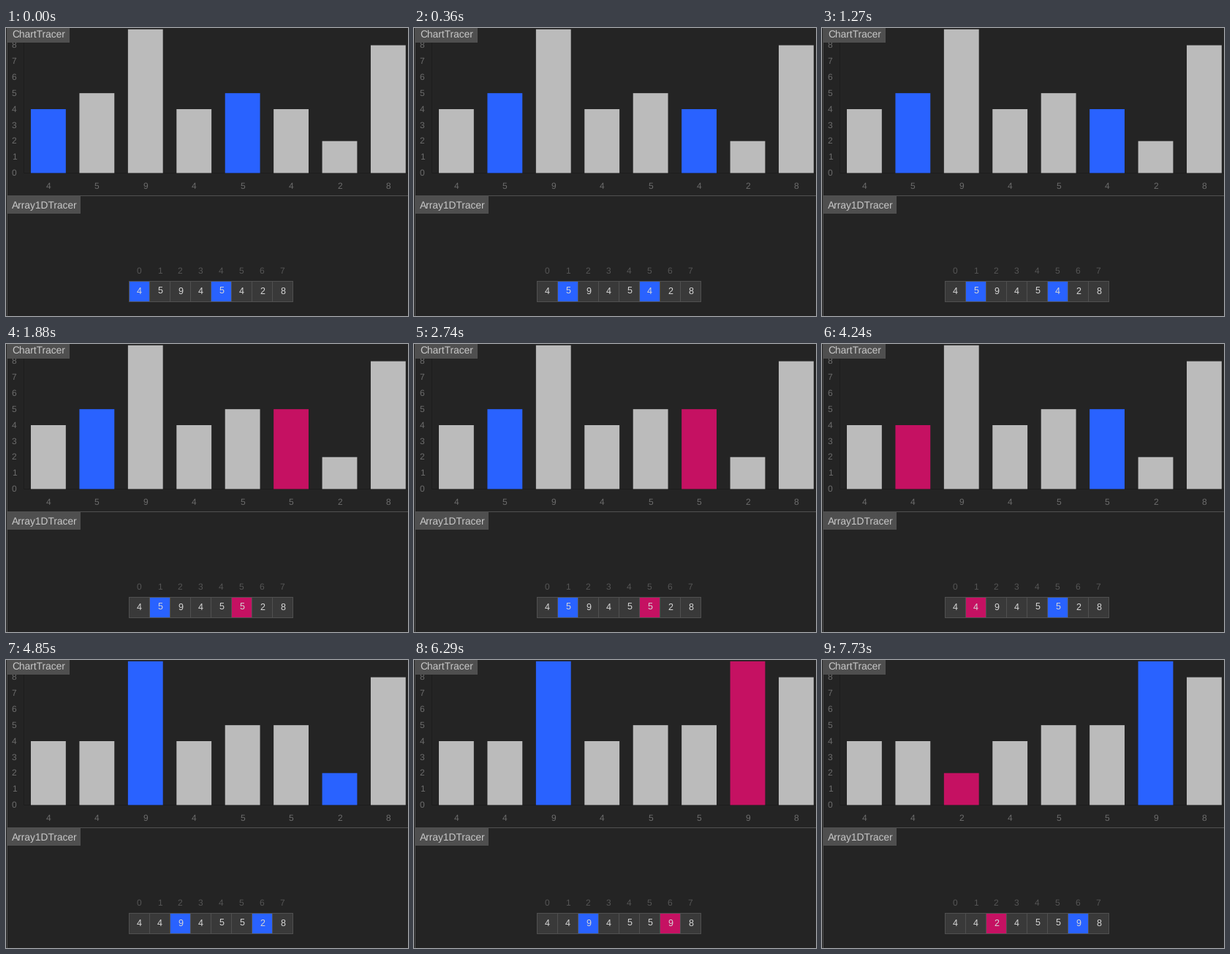
Recreate the animation shown at these times as a matplotlib script. Size 550 by 394 pixels, loop 8 s.

```python
import matplotlib.pyplot as plt
from matplotlib.animation import FuncAnimation
from matplotlib.patches import Rectangle

plt.rcParams["font.family"] = "Liberation Sans"
plt.rcParams["text.hinting"] = "none"
plt.rcParams["toolbar"] = "None"

W, H, DPI = 550, 394, 100
LOOP, STEP = 8000, 20

BACK, CELL, EDGE, TAG = "#242424", "#393939", "#505050", "#4f4f4f"
BAR, BLUE, PINK = "#bbbbbb", "#2962ff", "#c51162"

START = [4, 5, 9, 4, 5, 4, 2, 8]
# start time, selected indices, patched {index: new value}
STEPS = [
    (0, (0, 4), {}),
    (360, (1, 5), {}),
    (1880, (1,), {5: 5}),
    (3320, (5,), {1: 4}),
    (4850, (2, 6), {}),
    (6290, (2,), {6: 9}),
    (7730, (6,), {2: 2}),
]

BASE, UNIT = 198.4, 21.85
BAR_X, BAR_STEP = 34, 66.43
BAR_W = 0.72 * BAR_STEP
CELL_X, CELL_Y, CELL_W = 168, 346, 28

fig = plt.figure(figsize=(W / DPI, H / DPI), dpi=DPI, facecolor=BACK)
ax = fig.add_axes([0, 0, 1, 1])
ax.set_xlim(0, W)
ax.set_ylim(H, 0)
ax.axis("off")


def box(x, y, w, h, color, z=1):
    return ax.add_patch(Rectangle((x, y), w, h, fc=color, lw=0,
                                  zorder=z, snap=False))


def label(x, y, s, px, color, ha="center", z=4):
    return ax.text(x, y, s, fontsize=px * 72 / DPI, color=color,
                   ha=ha, va="baseline", zorder=z)


def tag(y, w, h, s, baseline):
    box(2, y, w, h, TAG, 5)
    label(8, baseline, s, 13.7, "#c8c8c8", "left", 6)


# panels
box(1, 0, 1, H, EDGE)
box(1, 229, W - 1, 1, EDGE)
tag(0, 85, 20, "ChartTracer", 13)
tag(230, 100, 24, "Array1DTracer", 247)

# chart axes
box(24, 0, 1, 199, "#1d1d1d")
box(24, 198, W - 24, 1, "#1d1d1d")
for v in range(9):
    label(11.2, BASE + 3.7 - UNIT * v, str(v), 12, "#6c6c6c")

bars, bar_texts, cells, cell_texts = [], [], [], []
for i, v in enumerate(START):
    x = BAR_X + BAR_STEP * i
    bars.append(box(x, BASE, BAR_W, -UNIT * v, BAR, 2))
    bar_texts.append(label(x + BAR_W / 2, 219.6, str(v), 12, "#6c6c6c"))

    x = CELL_X + CELL_W * i
    box(x, CELL_Y, CELL_W + 1, CELL_W + 1, EDGE)
    cells.append(box(x + 1, CELL_Y + 1, CELL_W - 1, CELL_W - 1, CELL, 2))
    label(x + 14, 336, str(i), 12, "#555555")
    cell_texts.append(label(x + 14.5, 364, str(v), 12.5, "#d6d6d6"))


def state(t):
    values = list(START)
    for start, selected, patched in STEPS:
        if t < start:
            break
        for i, v in patched.items():
            values[i] = v
        marks = {i: BLUE for i in selected}
        marks.update({i: PINK for i in patched})
    return values, marks


def update(n):
    values, marks = state((n + 0.5) * STEP)
    for i, v in enumerate(values):
        bars[i].set_height(-UNIT * v)
        bars[i].set_facecolor(marks.get(i, BAR))
        cells[i].set_facecolor(marks.get(i, CELL))
        bar_texts[i].set_text(str(v))
        cell_texts[i].set_text(str(v))
    return bars + cells + bar_texts + cell_texts


anim = FuncAnimation(fig, update, frames=LOOP // STEP, interval=STEP,
                     repeat=True, repeat_delay=0)
plt.show()
```
